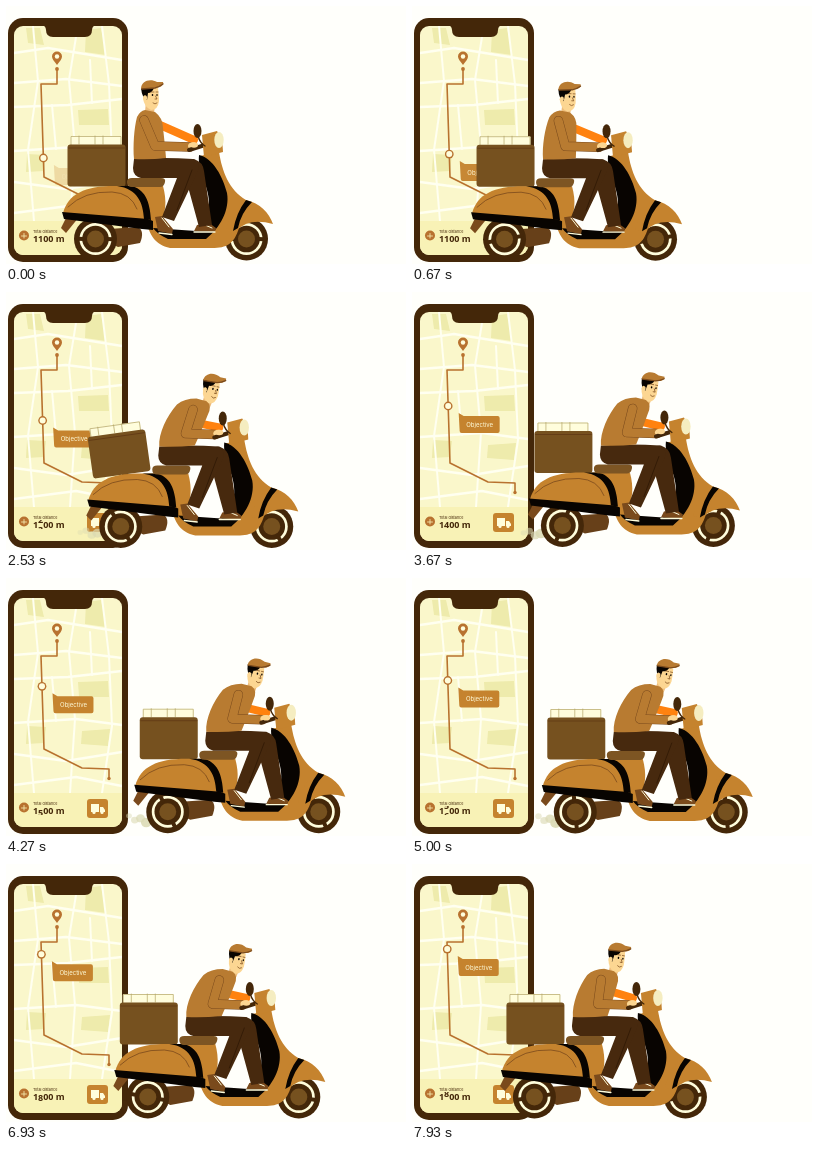
Animation of 400 by 258 pixels, one loop 8000 ms. Source, as an HTML page with a canvas:

```html
<!DOCTYPE html>
<html lang="en">
<head>
<meta charset="utf-8">
<title>Scooter delivery</title>
<style>
  html, body { margin: 0; width: 100%; height: 100%; overflow: hidden; background: #fffffb; }
  canvas { display: block; width: 100vw; height: 100vh; }
</style>
</head>
<body>
<canvas id="stage"></canvas>
<script>
const W = 400, H = 258, LOOP = 8000;
const canvas = document.getElementById('stage');
const ctx = canvas.getContext('2d');
const dpr = window.devicePixelRatio || 1;
canvas.width = W * dpr;
canvas.height = H * dpr;

const C = {
  page: '#fffffb', frame: '#442709', screen: '#faf7cb', road: '#fffff0', park: '#eeebac',
  panel: '#f8f2b6', route: '#b8722f', orange: '#c5832e', box: '#76511f', shirt: '#b87b31',
  sleeve: '#ff820f', trousers: '#47290e', black: '#080401', skin: '#fcd692', cream: '#fffddc',
  seat: '#7d5523', smoke: '#dad9b2', line: '#7a4a1c'
};

// Smooth curve through [time, value] keys
function track(t, keys) {
  const n = keys.length - 1;
  if (t <= keys[0][0]) return keys[0][1];
  if (t >= keys[n][0]) return keys[n][1];
  let i = 0;
  while (t > keys[i + 1][0]) i++;
  const rate = k => (keys[k + 1][1] - keys[k][1]) / (keys[k + 1][0] - keys[k][0]);
  const slope = k => {
    if (k === 0) return rate(0);
    if (k === n) return rate(n - 1);
    const a = rate(k - 1), b = rate(k);
    return a * b <= 0 ? 0 : 2 * a * b / (a + b);
  };
  const [t0, a] = keys[i], [t1, b] = keys[i + 1], d = t1 - t0, u = (t - t0) / d;
  const u2 = u * u, u3 = u2 * u;
  return a * (2 * u3 - 3 * u2 + 1) + b * (3 * u2 - 2 * u3) +
    d * (slope(i) * (u3 - 2 * u2 + u) + slope(i + 1) * (u3 - u2));
}

const ease = u => (1 - Math.cos(Math.PI * Math.min(1, Math.max(0, u)))) / 2;

function rideX(t) {
  if (t < 1400) return 6.5 * ease(t / 1400);
  if (t < 4800) return 6.5 + 67.5 * ease((t - 1400) / 3200);
  return 74 * (1 - ease((t - 4800) / 5850));
}

const lean = t => track(t, [[0, 0], [1400, 17], [2530, 35], [3670, 32], [5000, 34], [5930, 38], [8000, 26.5]]);
const rideY = t => track(t, [[0, 0], [1400, .5], [2530, 1.5], [3670, .5], [5000, 1], [5930, 0], [8000, 0]]);
const boxTilt = t => track(t, [[2000, 0], [2530, -8], [3000, 0]]);
const markerY = t => track(t, [[0, 152], [1400, 143], [2530, 128.5], [3670, 114], [5000, 102.5], [5930, 96], [8000, 84.7]]);
const digitStarts = [1270, 2390, 3250, 4050, 4860, 5600, 6700, 7820];

function fill(d, color) {
  ctx.fillStyle = color;
  ctx.fill(new Path2D(d));
}

function stroke(d, color, width) {
  ctx.strokeStyle = color;
  ctx.lineWidth = width;
  ctx.stroke(new Path2D(d));
}

function oval(x, y, rx, ry, color) {
  ctx.fillStyle = color;
  ctx.beginPath();
  ctx.ellipse(x, y, rx, ry, 0, 0, Math.PI * 2);
  ctx.fill();
}

function round(x, y, w, h, r, color) {
  ctx.fillStyle = color;
  ctx.beginPath();
  ctx.roundRect(x, y, w, h, r);
  ctx.fill();
}

function text(s, x, y, font, color, align = 'left') {
  ctx.font = font;
  ctx.fillStyle = color;
  ctx.textAlign = align;
  ctx.fillText(s, x, y);
}

function group(draw) {
  ctx.save();
  draw();
  ctx.restore();
}

function clipRect(x, y, w, h, r) {
  ctx.beginPath();
  ctx.roundRect(x, y, w, h, r);
  ctx.clip();
}

function map() {
  fill('M80 24L95 22L100 49L79 46Z M72 104L102 103L103 119L73 119Z M76 153L104 151L102 168L75 166Z' +
    'M20 22L34 22L38 39L22 37Z M21 148L40 149L38 165L20 166Z', C.park);
  stroke('M8 47L42 42L116 54 M8 77L60 73L116 80 M8 101L62 99L116 93 M8 145L70 141L116 147' +
    'M8 176L60 183L116 174 M8 207L70 199L116 208', C.road, 2.4);
  stroke('M27 20L32 75L22 144L28 215 M70 31L63 74L69 141L64 215 M96 20L103 78L106 148L96 215' +
    'M46 99L50 143 M84 54L86 97', C.road, 2);
  stroke('M51 63V78H35L38 171L76 190L103 191V200', C.route, 1.6);
  oval(51, 63, 1.9, 1.9, C.route);
  oval(103, 200.5, 1.7, 1.7, C.route);
  fill('M51 59C48 55 46 53 46 50.5A5 5 0 0 1 56 50.5C56 53 54 55 51 59Z', C.route);
  oval(51, 50.5, 2.2, 2.2, C.cream);
}

function marker(t) {
  const y = markerY(t), x = 35 + (y - 78) * 3 / 93;
  group(() => {
    ctx.globalAlpha = .25 + .75 * ease(t / 800);
    ctx.translate(x + 10.5, y + 10);
    fill('M0 -3L5 0H39Q41 0 41 2V15Q41 17 39 17H3Q1 17 1 15Z', C.orange);
    text('Objective', 21, 10.7, '6px Inter, sans-serif', C.cream, 'center');
  });
  oval(x, y, 4.4, 4.4, C.route);
  oval(x, y, 3, 3, C.cream);
}

function counter(t) {
  const font = 'bold 9px "Open Sans", sans-serif';
  const begun = digitStarts.filter(s => s <= t);
  const digit = 1 + begun.length;
  const roll = begun.length ? ease((t - begun[begun.length - 1]) / 300) : 1;
  text('1', 27, 236, font, C.frame);
  text('00 m', 37.2, 236, font, C.frame);
  group(() => {
    clipRect(31, 228, 7, 9, 0);
    text(digit, 32.1, 236 + 10 * (1 - roll), font, C.frame);
    if (roll < 1) text(digit - 1, 32.1, 236 - 10 * roll, font, C.frame);
  });
}

function phone(t) {
  round(2, 12, 120, 244, 15, C.frame);
  group(() => {
    clipRect(8, 20, 108, 229, 9);
    round(8, 20, 108, 229, 0, C.screen);
    map();
    marker(t);
    round(8, 215, 108, 34, 0, C.panel);
    fill('M36 19H90Q86 20 86 24Q86 31 79 31H47Q40 31 40 24Q40 20 36 19Z', C.frame);
    oval(18, 229.5, 5, 5, C.route);
    stroke('M15.5 230H20.5M18 227.5V232', C.panel, .8);
    text('Total distance', 27, 227, '3.7px Inter, sans-serif', C.frame);
    counter(t);
    round(81, 221, 21, 19, 3, C.orange);
    fill('M85 226H93V234H85Z M94 229H97L99 232V234H94Z', C.cream);
    oval(88, 234.5, 1.6, 1.6, C.cream);
    oval(96, 234.5, 1.6, 1.6, C.cream);
  });
}

function smoke(t, x) {
  const strength = Math.min(ease((t - 2000) / 700), 1 - ease((t - 6100) / 900));
  if (strength <= 0) return;
  group(() => {
    for (let i = 0; i < 4; i++) {
      const u = (t / 800 + i / 4) % 1;
      ctx.globalAlpha = strength * .9 * (1 - u * .6);
      const r = 5.5 * (1 - u * .55);
      oval(x + 70 - 23 * u, 242 - 5 * u + (i % 2) * 3, r, r * .9, C.smoke);
    }
  });
}

function wheel(x, t) {
  oval(x, 233, 21.5, 21.5, C.frame);
  oval(x, 233, 16, 16, C.cream);
  oval(x, 233, 13.3, 13.3, C.frame);
  oval(x, 233, 8.5, 8.5, C.box);
  group(() => {
    ctx.translate(x, 233);
    ctx.rotate(t / 110);
    stroke('M-17 0H-12M12 0H17', C.frame, 4);
  });
}

function cargo(t) {
  const tilt = boxTilt(t);
  group(() => {
    ctx.translate(116, 180 + tilt * .35);
    ctx.rotate(tilt * Math.PI / 180);
    ctx.translate(-116, -180);
    round(64.5, 130, 51, 12, 1, C.cream);
    stroke('M65 139V130.5H115V139 M73 130V138 M89 130V138 M97 130V138', '#b3a566', .7);
    round(61.5, 138.5, 58, 42, 3, C.box);
    stroke('M62.5 142H118.5', '#633b16', .9);
  });
}

function scooterBody(t) {
  fill('M103 223L132 221Q139 225 134 237L112 241Q101 237 103 223Z', '#674019');
  wheel(89.5, t);
  wheel(240.5, t);
  fill('M61 210L73 211L60 227L55 222Z', C.line);
  cargo(t);
  fill('M122 180L157 180C161 195 160 207 154 217L142 216Z', C.orange);
  fill('M194 150L213 146C216 165 223 184 240 194L233 222C228 238 221 242 206 242L164 242' +
    'C149 239 143 228 140 214L154 214L162 229H198C214 214 214 190 204 172Z', C.orange);
  fill('M57 207C62 188 79 180 108 180L122 180C137 183 142 197 142 214Z', C.orange);
  fill('M111 180C132 183 137 197 138 213L145 214C144 196 139 182 124 180Z', C.black);
  fill('M56 206L142 213L147 215V224L136 223L58 213Z', C.black);
  stroke('M62 201Q78 185 106 186Q125 187 131 203', C.line, .8);
  fill('M121 176Q121 172 126 172H155Q160 172 159 176Q158 181 154 181H126Q121 181 121 176Z', C.seat);
  fill('M193 149C207 152 217 171 221 187C224 204 214 222 200 233L162 233C155 230 150 226 147 222' +
    'L190 225C206 211 205 194 199 178C195 166 192 158 193 149Z', C.black);
  fill('M220 224C224 207 231 197 240 194C254 197 263 207 267 218Q243 211 230 225Z', C.orange);
  fill('M240 194L246 196Q235 207 232 222L227 225Q230 207 240 194Z', C.black);
}

function legs() {
  fill('M149 211L156 210L167 223L166 228L152 225Z M191 219L203 217L210 222L209 226L188 225Z', C.line);
  stroke('M153 227L166 228.5 M188 226H209', C.cream, 1.3);
  stroke('M156 212L163 221 M199 219L206 222', C.cream, 1);
  fill('M171 155L188 153Q197 156 198 165L206 219L193 221L181 177Z', C.trousers);
  fill('M128 153Q158 151 187 153Q196 158 190 169L168 215L156 211L171 172' +
    'H135Q127 170 127 162Z', C.trousers);
  stroke('M186 164L171 204', '#2c1604', .7);
}

function limb(points, color, width) {
  ctx.strokeStyle = color;
  ctx.lineWidth = width;
  ctx.beginPath();
  points.forEach(([x, y]) => ctx.lineTo(x, y));
  ctx.stroke();
}

function head(L) {
  group(() => {
    ctx.translate(145 + L, 90 + .17 * L);
    ctx.rotate(L * .38 * Math.PI / 180);
    fill('M-5 5L4 9L3 17L-6 16Z', '#eebd7c');
    fill('M-7 -8H7Q8 0 8 5Q7 14 0 14Q-7 11 -8 2Z', C.skin);
    fill('M-10 -8H3Q1 -3 -3 -3L-4 4Q-9 2 -10 -8Z', C.black);
    oval(-6, 2, 2, 2.8, C.skin);
    fill('M-10 -7C-10 -15 -1 -18 6 -14L12 -14Q13 -11 9 -9L4 -8Z', C.shirt);
    stroke('M-9 -7L4 -8Q8 -9 12 -12', C.line, 1.3);
    oval(1.5, -1, .8, 1.1, C.black);
    oval(6, -1, .7, 1, C.black);
    stroke('M0 -4H3 M5 -4H7 M4.5 0L6 3H4 M2 7Q4 9 6 7', C.line, .7);
  });
}

function rider(L) {
  const shoulder = [138 + .68 * L, 114 + .06 * L];
  const elbow = [149 + .15 * L, 140];
  legs();
  limb([[154 + .5 * L, 119 + .33 * L], [188, 134]], C.sleeve, 8);
  head(L);
  fill(`M128 153C127 140 ${128 + .22 * L} 122 ${131 + .42 * L} 111
    Q${134 + .55 * L} 105 ${139 + .75 * L} ${104 + .03 * L}
    L${149 + .75 * L} ${106 + .05 * L}
    Q${157 + .7 * L} 112 ${157 + .55 * L} 122
    Q${159 + .3 * L} 139 ${160 + .1 * L} 152Q143 154 128 153Z`, C.shirt);
  limb([shoulder, elbow, [184, 141]], C.line, 9.5);
  limb([shoulder, elbow, [184, 141]], C.shirt, 8.5);
  oval(187, 140, 5, 3.8, C.skin);
}

function handlebar() {
  stroke('M183 144L199 139', C.frame, 4);
  fill('M196 129L211 125Q217 134 217 146L198 151Z', C.orange);
  oval(213, 134, 4.7, 8, '#f5edc0');
  stroke('M192 130Q194 137 199 140', C.frame, 1.4);
  oval(191.5, 125, 4, 7, C.frame);
  oval(188, 139, 4, 2.8, C.skin);
}

function draw(t) {
  ctx.setTransform(dpr, 0, 0, dpr, 0, 0);
  ctx.lineJoin = 'round';
  ctx.lineCap = 'round';
  ctx.fillStyle = C.page;
  ctx.fillRect(0, 0, W, H);
  phone(t);
  smoke(t, rideX(t));
  group(() => {
    ctx.translate(rideX(t), rideY(t));
    scooterBody(t);
    rider(lean(t));
    handlebar();
  });
}

const start = performance.now();
function tick() {
  draw((performance.now() - start) % LOOP);
  requestAnimationFrame(tick);
}
tick();
</script>
</body>
</html>
```
